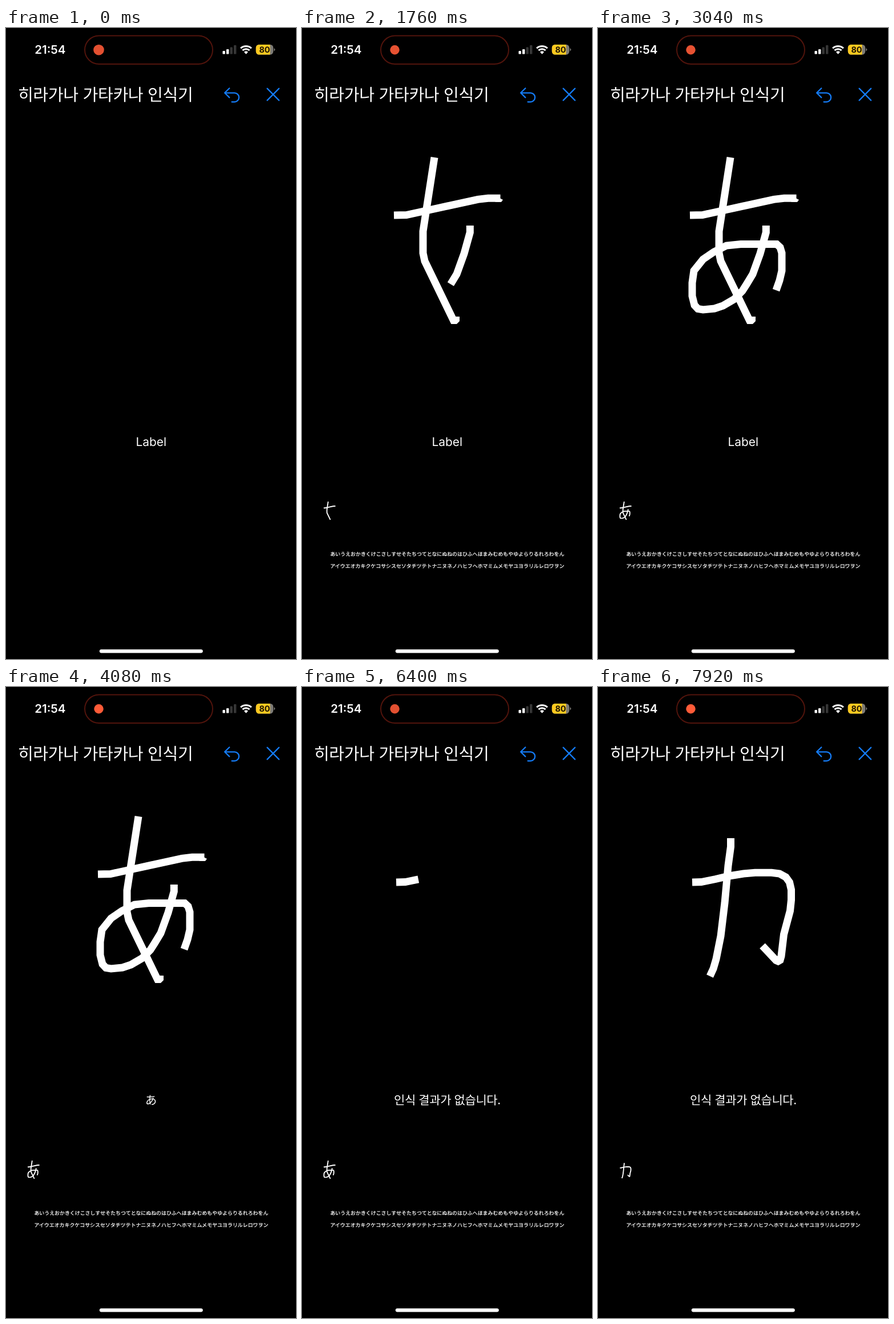
Animation of 508x1102 px, one loop 8 s. Source, as an HTML page:

```html
<!DOCTYPE html>
<html lang="ko">
<head>
<meta charset="utf-8">
<title>Kana pad</title>
<style>
  html, body { margin: 0; width: 100%; height: 100%; overflow: hidden; background: #000; }
  svg { display: block; width: 508px; height: 1102px; }
  text { fill: #fff; text-rendering: geometricPrecision; }
  .ui { font-family: Inter, "Liberation Sans", sans-serif; }
  .ko { font-family: "Noto Sans CJK KR", "Noto Sans CJK", sans-serif; letter-spacing: -.4px; }
  .ja { font-family: "Noto Sans CJK JP", "Noto Sans CJK", sans-serif; }
  .mid { text-anchor: middle; }
  .icon { fill: none; stroke: #147bf6; stroke-width: 2.3; stroke-linecap: round; stroke-linejoin: round; }
  .ink { fill: none; stroke: #fff; stroke-width: 13; }
  #thumb .ink { stroke-width: 17; }
  #kana text { stroke: #fff; stroke-width: .25; }
</style>
</head>
<body>
<svg viewBox="0 0 508 1102">
  <rect width="508" height="1102"/>

  <!-- status bar -->
  <text class="ui" x="50.2" y="45.3" font-size="20.5" font-weight="600">21:54</text>
  <rect x="138" y="13.5" width="224" height="49.5" rx="24.7" fill="none" stroke="#52140c" stroke-width="2"/>
  <circle id="dot" cx="162.5" cy="38.2"/>
  <g fill="#fff">
    <rect x="379.5" y="40" width="4.4" height="5.6" rx="1.2"/>
    <rect x="386" y="37" width="4.4" height="8.6" rx="1.2"/>
    <g fill="#363636">
      <rect x="392.5" y="33.5" width="4.4" height="12.1" rx="1.2"/>
      <rect x="399" y="30" width="4.4" height="15.6" rx="1.2"/>
    </g>
  </g>
  <g transform="translate(420.5 45.8)" fill="none" stroke="#fff" stroke-width="3.1">
    <path d="M-9.4 -10.4A14 14 0 0 1 9.4 -10.4"/>
    <path d="M-6.1 -6.7A9.1 9.1 0 0 1 6.1 -6.7"/>
    <path d="M0 0L-3.6 -4A5.4 5.4 0 0 1 3.6 -4Z" fill="#fff" stroke="none"/>
  </g>
  <clipPath id="cell"><rect x="437.8" y="29" width="30.4" height="17.5" rx="5.4"/></clipPath>
  <g clip-path="url(#cell)">
    <rect x="437" y="28" width="32" height="20" fill="#7d7b76"/>
    <rect x="437" y="28" width="25.5" height="20" fill="#fdc91f"/>
  </g>
  <path d="M469.4 35.2Q471.4 36 471.4 37.8T469.4 40.4Z" fill="#7d7b76"/>
  <text class="ui mid" x="453" y="43" font-size="14.4" font-weight="700" style="fill:#1c1500">80</text>

  <!-- header -->
  <text class="ko" x="20.9" y="126.8" font-size="29.2">히라가나 가타카나 인식기</text>
  <path class="icon" d="M391.3 105.2L383.1 113.3L391.3 121.4M383.6 113.3H400.2A7.9 7.9 0 0 1 400.2 129.1H395.6"/>
  <path class="icon" id="clear" d="M457.6 105.6L478.2 126.4M478.2 105.6L457.6 126.4"/>

  <g id="pad"></g>

  <!-- results -->
  <text class="ui mid" id="blank" x="254.2" y="729.8" font-size="20.9">Label</text>
  <text class="ja mid" id="found" lang="ja" x="254" y="729.4" font-size="20.5">あ</text>
  <text class="ko mid" id="none" x="254.4" y="729.3" font-size="21">인식 결과가 없습니다.</text>
  <g id="thumb" transform="translate(20.3 802.3) scale(.11)"></g>
  <g id="kana" class="ja" lang="ja" font-size="8.93">
    <text x="49.4" y="921.6">あいうえおかきくけこさしすせそたちつてとなにぬねのはひふへほまみむめもやゆよらりるれろわをん</text>
    <text x="49.4" y="943.3">アイウエオカキクケコサシスセソタチツテトナニヌネノハヒフヘホマミムメモヤユヨラリルレロワヲン</text>
  </g>
  <rect x="163.8" y="1085.2" width="181" height="6.3" rx="3.15" fill="#fff"/>
</svg>
<script>
const LOOP = 8000, STEP = 80, CLEAR = 5040, RESHOW = 7280;
const $ = id => document.getElementById(id);

// keys: [time, drawn part of the stroke]; thumb: when the small copy appears
const strokes = [
  { d: "M161 327L183 326.5 220 318.5 308 299.3 326 297.3 347.5 297.3",
    tail: "M346 297L352 300 349 304 338 303.8Z",
    keys: [[440, 0], [880, 1]], thumb: 960, gone: CLEAR, thumbGone: RESHOW },
  { d: "M232 226L212 355 212 393 215 407 267 514",
    tail: "M261 517H271L276 512V504H268Z",
    keys: [[1080, 0], [1440, 1]], thumb: 1520, gone: CLEAR, thumbGone: RESHOW },
  { d: "M294.3 345L294.3 357 284 394 271 430 260 448 253 459 238 474 219 485 204 490 184 492 175 490.5 " +
       "169 484 165 468 165 445 168 424 184 404 203 391 225 380 250 377.5 313 377.5 319 383 322 393 322 424 318 441 312 458",
    keys: [[1520, 0], [1760, .207], [2480, 1]], thumb: 2560, gone: CLEAR, thumbGone: RESHOW },
  { d: "M165 341L181 340.5 206 335.5 230 330 255 326 275 324.3 304 324.3 318 326 329 332 335.5 341 338.5 354 " +
       "338.5 372 336.5 391 325.5 432 321 470 319 477 315.5 479 312 477.5 288 452",
    keys: [[6320, 0], [7040, .983], [7200, .99], [7280, 1]], thumb: RESHOW, gone: LOOP, thumbGone: LOOP },
  { d: "M232.5 264L232.5 279 228 312 222 377 215 435 207 475 202 492 196 505",
    keys: [[7360, 0], [7600, 1]], thumb: 7760, gone: LOOP, thumbGone: LOOP }
];

function addPath(parent, d, tail) {
  const p = document.createElementNS("http://www.w3.org/2000/svg", "path");
  p.setAttribute("d", d);
  if (tail) p.setAttribute("fill", "#fff");
  else p.setAttribute("class", "ink");
  return parent.appendChild(p);
}

for (const s of strokes) {
  s.line = addPath($("pad"), s.d);
  s.len = s.line.getTotalLength();
  s.mini = addPath($("thumb"), s.d);
  if (s.tail) s.end = addPath($("pad"), s.tail, true);
}

const show = (el, on) => el.setAttribute("visibility", on ? "visible" : "hidden");

function at(keys, t) {
  if (t <= keys[0][0]) return keys[0][1];
  for (let i = 1; i < keys.length; i++) {
    const [t0, v0] = keys[i - 1], [t1, v1] = keys[i];
    if (t < t1) return v0 + (v1 - v0) * (t - t0) / (t1 - t0);
  }
  return keys[keys.length - 1][1];
}

function draw(t) {
  for (const s of strokes) {
    const part = at(s.keys, t), live = t < s.gone;
    show(s.line, live && part > 0);
    s.line.setAttribute("stroke-dasharray", part < 1 ? `${part * s.len} 2000` : "none");
    if (s.end) show(s.end, live && part >= 1);
    show(s.mini, t >= s.thumb && t < s.thumbGone);
  }
  show($("kana"), t >= 960);
  show($("blank"), t < 3280);
  show($("found"), t >= 3760 && t < CLEAR);
  show($("none"), t >= 3280 && t < 3760 || t >= CLEAR);
  $("clear").setAttribute("opacity", at([[4880, 1], [4960, .35], [5040, .35], [5280, 1]], t));

  // recording light
  const glow = .5 + .5 * Math.cos((t - 260) / 640 * 2 * Math.PI);
  const mix = (a, b) => Math.round(a + (b - a) * glow);
  $("dot").setAttribute("fill", `rgb(${mix(224, 255)},${mix(79, 91)},${mix(48, 56)})`);
  $("dot").setAttribute("r", at([[0, 9.3], [400, 8.2]], t));
}

const start = performance.now();
function tick(now) {
  const t = Math.max(0, now - start) % LOOP;
  draw(Math.floor(t / STEP + .01) * STEP);
  requestAnimationFrame(tick);
}
draw(0);
requestAnimationFrame(tick);
</script>
</body>
</html>
```
